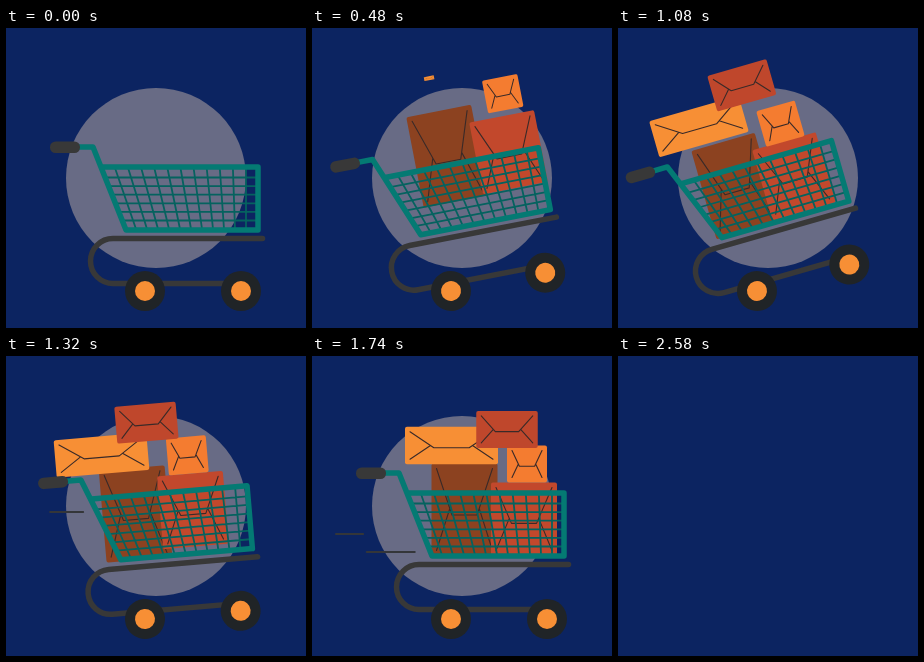
Recreate the animation shown at these times as an HTML page. Size 300x300 px, loop 4.7 s.

```html
<!DOCTYPE html>
<html lang="en">
<head>
<meta charset="utf-8">
<title>Shopping cart</title>
<style>
  html, body { margin: 0; width: 100%; height: 100%; overflow: hidden; background: #0c2461; }
  svg { display: block; width: 100%; height: 100%; }
  .tube { fill: none; stroke-width: 5.5; stroke-linejoin: round; stroke-linecap: round; }
  .teal { stroke: #047a73; }
  .dark { stroke: #383838; }
  .grid { fill: none; stroke: #05625f; stroke-width: 1.8; }
  .fold { fill: none; stroke: #3a2a28; stroke-width: 1.1; stroke-linecap: round; stroke-linejoin: round; }
  .dash { stroke: #343639; stroke-width: 2; stroke-linecap: round; }
</style>
</head>
<body>
<svg viewBox="0 0 300 300">
  <g id="scene">
    <circle cx="150" cy="150" r="90" fill="#686b85"/>
    <g id="lines"></g>
    <g id="cart">
      <g id="cards"></g>
      <g id="body">
        <path id="grid" class="grid"/>
        <path class="tube teal" d="M72 119H87L120 202H252V139H96"/>
        <path class="tube dark" d="M256.500 210.500H107A22.500 22.500 0 0 0 107 255.500H235"/>
        <rect x="44" y="113.500" width="30" height="11.500" rx="5.500" fill="#383838"/>
      </g>
      <g id="wheels"></g>
    </g>
  </g>
</svg>
<script>
const LOOP = 4700, HIDE = 2580;
const TILT = 16.4, PIVOT = { x: 139, y: 263 };
const RISE = [100, 720], RETURN = [1040, 1480];
const BOUNCE_START = 1440, BOUNCE_PERIOD = 200;
const DROP = 38, GROW_TIME = 240, FALL_DELAY = 170, FALL_TIME = 570;
const DASH_TIME = 550;

const $ = id => document.getElementById(id);
const clamp = v => Math.min(1, Math.max(0, v));
const smooth = p => p * p * (3 - 2 * p);
const span = (t, [from, to]) => clamp((t - from) / (to - from));

function add(parent, tag, attrs) {
  const el = document.createElementNS('http://www.w3.org/2000/svg', tag);
  for (const key in attrs) el.setAttribute(key, attrs[key]);
  return parent.appendChild(el);
}

// x, y: resting centre; sway: shift at full swing; hop, phase: bounce while rolling
const cards = [
  { x: 152.5, y: 155.5, w: 66, h: 92, color: '#8c4220', start: 80, sway: [14, -2], hop: 2, phase: Math.PI / 2 },
  { x: 212, y: 165.5, w: 66, h: 73, color: '#c2482c', start: 170, sway: [16, 7], hop: 2.5, phase: Math.PI / 2 },
  { x: 215, y: 111.5, w: 40, h: 37, color: '#f47c30', start: 265, sway: [20, 8], hop: 3.5, phase: Math.PI / 2 },
  { x: 139.5, y: 91, w: 93, h: 37.5, color: '#f78f35', start: 455, sway: [30, -5], hop: 1.5, phase: Math.PI / 2 },
  { x: 195, y: 73.5, w: 61.5, h: 37, color: '#bf472c', start: 535, sway: [38, 6], hop: 5, phase: 0 }
];

function makeCard(card) {
  const { w, h } = card;
  const g = add($('cards'), 'g', {});
  add(g, 'rect', { x: -w / 2, y: -h / 2, width: w, height: h, rx: 2, fill: card.color });
  const ix = w / 2 - 5, iy = h / 2 - 5;
  const mx = w * 0.19, my = h * 0.06;
  const jx = mx + (ix - mx) * 0.14, jy = my - (iy + my) * 0.14;
  add(g, 'path', {
    class: 'fold',
    d: `M${-ix} ${-iy}L${-mx} ${my}H${mx}L${ix} ${-iy}M${-ix} ${iy}L${-jx} ${jy}M${ix} ${iy}L${jx} ${jy}`
  });
  card.el = g;
}

// Each streak runs from right to left, once per start time
const streaks = [
  { y: 156, from: 78, to: 12, starts: [1133, 1877] },
  { y: 163.5, from: 120, to: 14, starts: [1967] },
  { y: 178, from: 89, to: 24, starts: [1344, 2053] },
  { y: 196, from: 110, to: 14, starts: [1530] }
];

function buildGrid() {
  let d = '';
  for (let i = 0; i < 11; i++) d += `M${109 + 13.1 * i} 140L${130 + 11 * i} 201`;
  for (let i = 0; i < 6; i++) {
    const y = 149.5 + 8.6 * i;
    d += `M${95 + (y - 139) * 0.4} ${y}H251`;
  }
  $('grid').setAttribute('d', d);
}

cards.forEach(makeCard);
streaks.forEach(s => s.el = add($('lines'), 'line', { class: 'dash', y1: s.y, y2: s.y }));
buildGrid();
for (const x of [139, 235]) {
  add($('wheels'), 'circle', { cx: x, cy: 263, r: 20, fill: '#202427' });
  add($('wheels'), 'circle', { cx: x, cy: 263, r: 10, fill: '#f78f35' });
}

// Normalised speed of the tilt, used to make the load lag behind
function swing(t) {
  const speed = range => {
    const p = span(t, range);
    return 4 * p * (1 - p);
  };
  return 0.65 * speed(RISE) - 1.08 * speed(RETURN);
}

function hop(t, size, phase) {
  if (t < BOUNCE_START) return 0;
  const a = (t - BOUNCE_START) / BOUNCE_PERIOD * 2 * Math.PI;
  return size / 2 * (Math.sin(a + phase) - Math.sin(phase));
}

function drawCard(card, t, lag) {
  const grow = clamp((t - card.start) / GROW_TIME);
  const fall = smooth(clamp((t - card.start - FALL_DELAY) / FALL_TIME));
  const x = card.x + lag * card.sway[0];
  const y = card.y - DROP * (1 - fall) + lag * card.sway[1] + hop(t, card.hop, card.phase);
  card.el.setAttribute('visibility', grow > 0 ? 'inherit' : 'hidden');
  card.el.setAttribute('transform', `translate(${x} ${y}) scale(${grow})`);
}

function drawStreak(s, t) {
  const start = s.starts.find(v => t > v && t < v + DASH_TIME);
  s.el.setAttribute('visibility', start === undefined ? 'hidden' : 'inherit');
  if (start === undefined) return;
  const p = (t - start) / DASH_TIME * 1.5;
  const at = v => s.from + (s.to - s.from) * clamp(v);
  s.el.setAttribute('x1', at(p - 0.5));
  s.el.setAttribute('x2', at(p));
}

function draw(t) {
  $('scene').setAttribute('visibility', t < HIDE ? 'visible' : 'hidden');
  const angle = -TILT * (smooth(span(t, RISE)) - smooth(span(t, RETURN)));
  $('cart').setAttribute('transform', `rotate(${angle} ${PIVOT.x} ${PIVOT.y})`);
  $('body').setAttribute('transform', `translate(0 ${hop(t, 2, Math.PI / 2)})`);
  const lag = swing(t);
  cards.forEach(c => drawCard(c, t, lag));
  streaks.forEach(s => drawStreak(s, t));
}

const begin = performance.now();
function tick() {
  draw((performance.now() - begin) % LOOP);
  requestAnimationFrame(tick);
}
tick();
</script>
</body>
</html>
```
